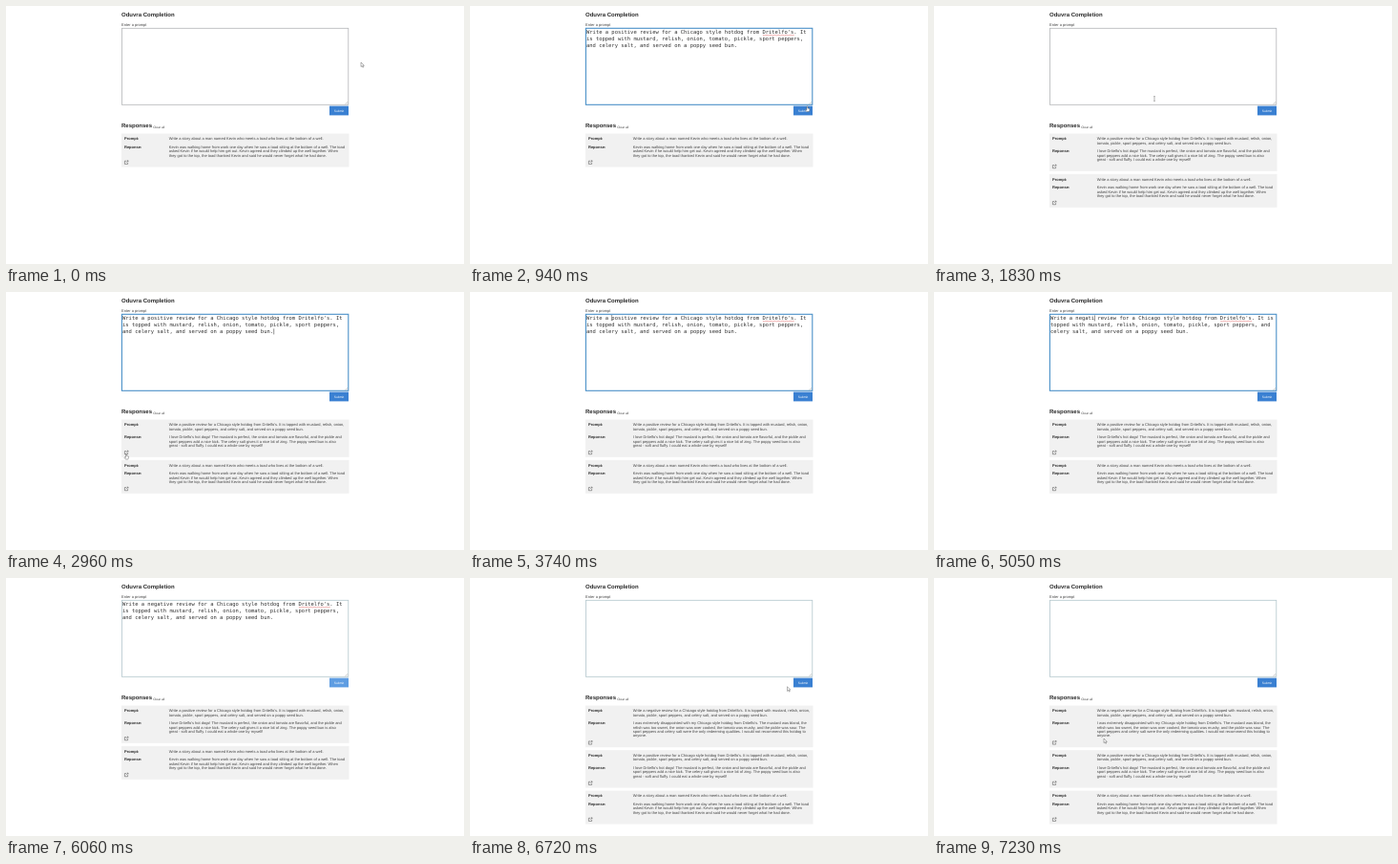
An HTML page that plays this animation: 480 px wide and 270 px high, repeating every 7.28 s.

```html
<!DOCTYPE html>
<html lang="en">
<head>
<meta charset="utf-8">
<title>Completion demo</title>
<style>
  html, body { margin: 0; width: 100%; height: 100%; overflow: hidden; background: #fff; }
  svg { display: block; width: 480px; height: 270px; text-rendering: geometricPrecision; }
  text { font-family: "Liberation Sans", Arial, sans-serif; font-size: 4px; fill: #444; }
  .head { font-size: 6px; font-weight: bold; fill: #2b2b2b; }
  .bold { font-weight: bold; fill: #2b2b2b; }
  .mono text { font-family: "DejaVu Sans Mono", monospace; font-size: 5.48px; fill: #333; }
</style>
</head>
<body>
<svg id="stage" viewBox="0 0 480 270"></svg>
<script>
const LOOP = 7280;
const COL = 3.3, LEFT = 122, TOP = 29.2, ROW = 7, COLS = 71;
const NAME = "Dritelfo's";
const stage = document.getElementById("stage");

function add(parent, tag, attrs = {}, label) {
  const el = document.createElementNS("http://www.w3.org/2000/svg", tag);
  for (const key in attrs) el.setAttribute(key, attrs[key]);
  if (label !== undefined) el.textContent = label;
  parent.appendChild(el);
  return el;
}
const set = (el, attrs) => { for (const key in attrs) el.setAttribute(key, attrs[key]); };
const show = (el, on) => el.setAttribute("visibility", on ? "visible" : "hidden");
const within = (t, a, b) => t >= a && t < b;

const request = word =>
  `Write a ${word} review for a Chicago style hotdog from ${NAME}. It is topped with mustard, ` +
  "relish, onion, tomato, pickle, sport peppers, and celery salt, and served on a poppy seed bun.";

const reviewPrompt = word => [
  `Write a ${word} review for a Chicago style hotdog from ${NAME}. It is topped with mustard, relish, onion,`,
  "tomato, pickle, sport peppers, and celery salt, and served on a poppy seed bun."
];

const toad = {
  prompt: ["Write a story about a man named Kevin who meets a toad who lives at the bottom of a well."],
  reply: [
    "Kevin was walking home from work one day when he saw a toad sitting at the bottom of a well. The toad",
    "asked Kevin if he would help him get out. Kevin agreed and they climbed up the well together. When",
    "they got to the top, the toad thanked Kevin and said he would never forget what he had done."
  ]
};
const good = {
  prompt: reviewPrompt("positive"),
  reply: [
    `I love ${NAME} hot dogs! The mustard is perfect, the onion and tomato are flavorful, and the pickle and`,
    "sport peppers add a nice kick. The celery salt gives it a nice bit of zing. The poppy seed bun is also",
    "great - soft and fluffy. I could eat a whole one by myself!"
  ]
};
const bad = {
  prompt: reviewPrompt("negative"),
  reply: [
    `I was extremely disappointed with my Chicago style hotdog from ${NAME}. The mustard was bland, the`,
    "relish was too sweet, the onion was over cooked, the tomato was mushy, and the pickle was sour. The",
    "sport peppers and celery salt were the only redeeming qualities. I would not recommend this hotdog to",
    "anyone."
  ]
};

// Page
add(stage, "rect", { width: 480, height: 270, fill: "#fff" });
add(stage, "text", { x: 121, y: 11.4, class: "head" }, "Oduvra Completion");
add(stage, "text", { x: 121, y: 21 }, "Enter a prompt");
const box = add(stage, "rect", { x: 121.4, y: 23.3, width: 237.4, height: 80, fill: "#fff" });
add(stage, "path", { d: "M355.6 102.6l2.4-2.4M357 102.6l1-1", stroke: "#888", "stroke-width": 0.4 });
const button = add(stage, "rect", { x: 339, y: 104.6, width: 20, height: 9.8 });
add(stage, "text", { x: 349, y: 110.7, "text-anchor": "middle", style: "font-size:3.3px;fill:#fff" }, "Submit");
add(stage, "text", { x: 121, y: 127.4, class: "head" }, "Responses");
add(stage, "text", { x: 154.2, y: 127.9, style: "font-size:3.3px" }, "Clear all");

// Response cards
function makeCard({ prompt, reply }) {
  const g = add(stage, "g");
  const line = 4.35, shift = (prompt.length - 1) * line;
  const height = 35 + shift + (reply.length - 3) * line;
  add(g, "rect", { x: 121, width: 238.5, height, fill: "#f1f1f1" });
  add(g, "text", { x: 124, y: 6.7, class: "bold" }, "Prompt:");
  add(g, "text", { x: 124, y: 15.4 + shift, class: "bold" }, "Reponse:");
  prompt.forEach((s, i) => add(g, "text", { x: 170.8, y: 6.7 + i * line }, s));
  reply.forEach((s, i) => add(g, "text", { x: 170.8, y: 15.4 + shift + i * line }, s));
  add(g, "path", {
    d: "M126 -1.3h-1.6v3.2h3.2v-1.6M126 .3l1.9-1.9M126.7 -1.7h1.3v1.3",
    transform: `translate(0 ${height - 5})`, fill: "none", stroke: "#444", "stroke-width": 0.5
  });
  return { g, height };
}
const cards = [makeCard(bad), makeCard(good), makeCard(toad)];

function placeCards(first) {
  let y = 133.5;
  cards.forEach(({ g, height }, i) => {
    show(g, i >= first);
    if (i < first) return;
    g.setAttribute("transform", `translate(0 ${y})`);
    y += height + 3;
  });
}

// Editor
const mono = add(stage, "g", { class: "mono" });
const rows = [0, 1, 2].map(i => add(mono, "text", { x: LEFT, y: TOP + i * ROW }));
const squiggle = add(mono, "path", { fill: "none", stroke: "#e05555", "stroke-width": 0.45 });
const mark = add(mono, "rect", { y: 23.7, height: 7, fill: "#2f7fd0" });
const clip = add(add(stage, "clipPath", { id: "marked" }), "rect", { y: 23.7, height: 7 });
const marked = add(add(mono, "g", { "clip-path": "url(#marked)" }), "text",
  { x: LEFT + 8 * COL, y: TOP, style: "fill:#fff" }, "positive");
const caret = add(mono, "rect", { width: 0.5, height: 6, fill: "#222" });

function wrap(text) {
  const out = [""];
  for (const word of text.split(" ")) {
    const last = out[out.length - 1];
    const next = last ? last + " " + word : word;
    if (next.length > COLS) out.push(word);
    else out[out.length - 1] = next;
  }
  return out;
}

const wave = Array.from({ length: 17 }, (_, i) =>
  `${i ? "L" : "M"}${i * NAME.length * COL / 16} ${i % 2 ? 0.6 : 0}`).join("");

function drawEditor(t) {
  const typed = Math.min(8, 1 + Math.floor((t - 4780) / 54.2));
  const edited = within(t, 4780, 6600);
  const filled = within(t, 640, 1830) || within(t, 2960, 6600);
  const lines = filled ? wrap(request(edited ? "negative".slice(0, typed) : "positive")) : [""];
  rows.forEach((row, i) => {
    const s = lines[i] || "";
    if (row.textContent !== s) row.textContent = s;
  });

  const at = lines.findIndex(s => s.includes(NAME));
  show(squiggle, at >= 0 && !within(t, 2960, 3560));
  if (at >= 0) set(squiggle, {
    d: wave,
    transform: `translate(${LEFT + lines[at].indexOf(NAME) * COL} ${TOP + at * ROW + 1.1})`
  });

  const selecting = within(t, 3740, 4780);
  const width = 8 * COL * ease((t - 3740) / 460);
  for (const el of [mark, clip]) set(el, { x: LEFT + 8 * COL, width: selecting ? width : 0 });
  show(marked, selecting);

  let col = 0, row = 0;
  if (edited) col = 8 + typed;
  else if (filled) { row = lines.length - 1; col = lines[row].length; }
  set(caret, { x: LEFT + col * COL + 0.2, y: TOP - 4.8 + row * ROW });
  show(caret, within(t, 530, 860) || within(t, 2960, 3740) || within(t, 4780, 5600));

  const focus = within(t, 530, 1220) || within(t, 2960, 5640);
  set(box, {
    stroke: focus ? "#4a90c8" : t >= 5640 ? "#b3c6cc" : "#b4b6b8",
    "stroke-width": focus ? 1.1 : 0.8
  });
}

// Pointer: time, x, y, lift of the path that leads there
const path = [
  [0, 372, 59], [40, 372, 59], [180, 242, 48], [720, 242, 48], [940, 353.5, 105], [1220, 350, 108],
  [1270, 350, 108], [1540, 236, 95, 30], [1780, 236, 95], [1830, 231, 97], [2550, 125.6, 169],
  [2600, 126, 169.5], [2960, 126, 169.5], [3680, 148.5, 27], [3740, 148.5, 27], [4200, 174.8, 27],
  [4370, 174.8, 27], [4430, 175.4, 27], [5400, 175.4, 27], [5640, 349, 108], [6600, 349, 108],
  [7230, 178, 168], [LOOP, 178, 168]
];
const shapes = {
  arrow: add(stage, "path", { d: "M0 0v4.6l1.1-1 .8 1.7 .8-.4-.8-1.6h1.5z" }),
  hand: add(stage, "path", { d: "M-.5 0h.9v2l2 .5v1.8l-.6 1.3h-2.4l-1.5-2 .5-.4 1.1 .6z" }),
  beam: add(stage, "path", { d: "M-.8 -2.4h1.6M0 -2.4v4.8M-.8 2.4h1.6" })
};
for (const el of Object.values(shapes)) set(el, { fill: "#fff", stroke: "#555", "stroke-width": 0.45 });

function ease(u) {
  u = Math.max(0, Math.min(1, u));
  return u * u * (3 - 2 * u);
}

function drawPointer(t) {
  const i = path.findIndex(p => p[0] > t);
  const [t0, x0, y0] = path[i - 1], [t1, x1, y1, lift = 0] = path[i];
  const u = ease((t - t0) / (t1 - t0));
  const x = x0 + (x1 - x0) * u;
  const y = y0 + (y1 - y0) * u - lift * 4 * u * (1 - u);
  const inBox = x > 121 && x < 359 && y > 23 && y < 103.5;
  const onButton = x > 339 && x < 359 && y > 104 && y < 114.5;
  const onIcon = x > 123.5 && x < 128.5 && y > 165 && y < 171 && t < 3100;
  const kind = inBox ? "beam" : onButton || onIcon ? "hand" : "arrow";
  const hidden = within(t, 4730, 5400) || within(t, 6060, 6600);
  for (const key in shapes) show(shapes[key], key === kind && !hidden);
  shapes[kind].setAttribute("transform", `translate(${x} ${y})`);
}

function draw(t) {
  placeCards(t < 1830 ? 2 : t < 6600 ? 1 : 0);
  drawEditor(t);
  drawPointer(t);
  button.setAttribute("fill", within(t, 6060, 6600) ? "#5f9de2" : "#3a80d2");
}

const start = performance.now();
function tick() {
  draw((performance.now() - start) % LOOP);
  requestAnimationFrame(tick);
}
tick();
</script>
</body>
</html>
```
